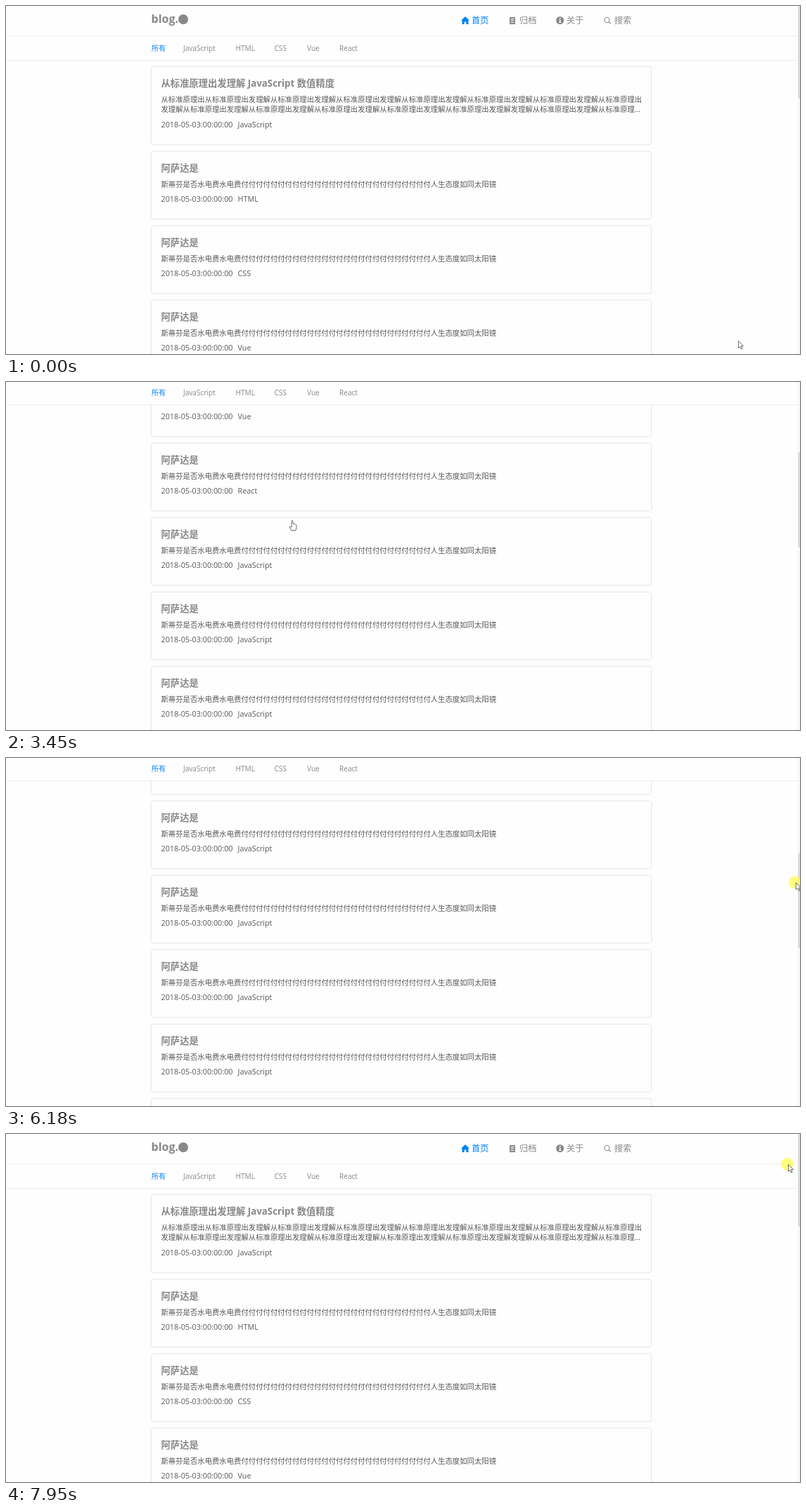
Recreate the animation shown at these times as an HTML page. Size 1129 by 496 pixels, loop 8 s.

```html
<!DOCTYPE html>
<html lang="zh">
<head>
<meta charset="utf-8">
<title>blog</title>
<style>
  html, body { margin: 0; width: 100%; height: 100%; overflow: hidden; background: #fefefe; }
  body { position: relative; font-family: "Open Sans", "Noto Sans CJK SC", "Noto Sans CJK", sans-serif; color: #888; }
  div, span, svg { position: absolute; }
  span { line-height: 20px; white-space: pre; }
  #page, #nav, #header { left: 0; width: 1129px; }
  #header { top: 0; height: 42px; border-bottom: 1px solid #f0f0f0; }
  #nav { height: 34px; background: #fefefe; border-bottom: 1px solid #ededed; }
  .card { left: 207px; width: 710px; background: #fefefe; border-radius: 2px; box-shadow: 0 0 3px rgba(0, 0, 0, .22); }
  .title { font-weight: 700; }
  .body { color: #585858; }
  .active { color: #007fff; }
  .icon { overflow: visible; fill: currentColor; top: 15px; }
  #logo { left: 245px; top: 12px; width: 14px; height: 14px; border-radius: 50%; background: #888; }
  #track { left: 1126px; top: 0; width: 3px; height: 496px; background: #f6f6f6; }
  #thumb { left: 0; width: 3px; background: #dcdcdc; border-radius: 2px; }
  #cursor { left: 0; top: 0; }
  #glow { left: -10px; top: -9px; width: 18px; height: 18px; border-radius: 50%; background: rgba(255, 252, 70, .7); }
  #cursor svg { left: 0; top: 0; overflow: visible; fill: #fff; stroke: #444; stroke-width: .8; stroke-linejoin: round; }
</style>
</head>
<body>
<div id="page">
  <div id="header"><div id="logo"></div></div>
</div>
<div id="nav"></div>
<div id="track"><div id="thumb"></div></div>
<div id="cursor">
  <div id="glow"></div>
  <svg id="arrow" width="8" height="13"><path d="M.4 .4V10.4L2.8 8.2 4.4 12 6 11.3 4.5 7.6H7.4Z"/></svg>
  <svg id="hand" width="11" height="16"><path d="M-1 9V1.2Q0-.6 1 1.2V5.2Q2.4 4.5 3 5.7 4.4 5.2 4.8 6.4 6 6.1 6 7.6V10.8L4.8 14.7H-1.2L-3.8 9.5Q-3.4 7.6-1 10Z"/></svg>
</div>
<script>
const LOOP = 8000;
const NAV_TOP = 43;      // scrolling past this pins the nav
const PIN_SHIFT = 52;    // content moves up when the nav leaves the flow
const THUMB_RATIO = 0.26;
const $ = id => document.getElementById(id);

// y is the vertical centre of the line
function addText(parent, x, y, size, text, cls = '') {
  const span = document.createElement('span');
  span.className = cls;
  span.textContent = text;
  span.style.cssText = `left:${x}px;top:${y - 10}px;font-size:${size}px`;
  parent.append(span);
}

function addCard(top, height, title, lines, tag) {
  const card = document.createElement('div');
  card.className = 'card';
  card.style.cssText = `top:${top}px;height:${height}px`;
  addText(card, 13.5, 23, 13.32, title, 'title');
  lines.forEach((line, i) => addText(card, 13.5, 46 + i * 14.4, 10.36, line, 'body'));
  addText(card, 13.5, height - 28, 10.8, '2018-05-03:00:00:00', 'body');
  addText(card, 122.5, height - 28, 10.8, tag, 'body');
  $('page').append(card);
}

const phrase = '从标准原理出发理解', stem = '从标准原理出', tail = '发理解';
addCard(87, 110, phrase + ' JavaScript 数值精度', [
  stem + phrase.repeat(6) + stem,
  tail + phrase.repeat(5) + tail + phrase + '从标准原理…'
], 'JavaScript');

const filler = '斯蒂芬是否水电费水电费' + '付'.repeat(26) + '人生态度如同太阳镜';
const tags = ['HTML', 'CSS', 'Vue', 'React'];
for (let i = 0; i < 16; i++) {
  addCard(208 + i * 106, 95, '阿萨达是', [filler], tags[i] || 'JavaScript');
}

[[207, '所有'], [252, 'JavaScript'], [326.5, 'HTML'], [381.5, 'CSS'], [428, 'Vue'], [474, 'React']]
  .forEach(([x, label], i) => addText($('nav'), x, 17, 10.1, label, i ? '' : 'active'));

addText($('header'), 206.5, 18, 16, 'blog.', 'title');
[
  [647, '首页', '<path d="M0 0 6-5.7 12 0H10.4V5.3H7.3V1.8H4.7V5.3H1.6V0Z" transform="translate(0 5.7)"/>'],
  [715, '归档', '<path fill-rule="evenodd" d="M1 1H9V11H1ZM2.7 3V4H7.3V3ZM2.7 5.2V6.2H7.3V5.2ZM2.7 8V9H7.3V8Z"/>'],
  [782, '关于', '<circle cx="5.7" cy="5.5" r="5.5"/><path fill="#fff" d="M5 2H6.7V3.5H5ZM4.6 4.5H6.6V8H7.3V9H4.3V8H5V5.5H4.6Z"/>'],
  [850, '搜索', '<g fill="none" stroke="currentColor" stroke-width="1.1"><circle cx="4.4" cy="4.9" r="3.6"/><path d="M7 7.5 9.8 10.3"/></g>']
].forEach(([x, label, shape], i) => {
  const cls = i ? '' : 'active';
  $('header').insertAdjacentHTML('beforeend',
    `<svg class="icon ${cls}" style="left:${x}px" width="12" height="12">${shape}</svg>`);
  addText($('header'), x + 15, 20.5, 12.2, label, cls);
});

const ramp = (t, from, to) => Math.min(1, Math.max(0, (t - from) / (to - from)));
const between = (t, from, to) => t >= from && t < to;

// Two wheel scrolls down, then the scrollbar is dragged up fast and released slowly
const scrollAt = t =>
  373 * ramp(t, 2311, 3121) + 718 * ramp(t, 3420, 5100)
  - 959 * ramp(t, 5500, 6640) - 132 * ramp(t, 6640, 7530);

// Pointer moves: from, to, then the place reached
const moves = [
  [60, 440, 426, 236], [940, 1360, 384, 186], [2360, 2740, 401, 189],
  [3200, 3300, 407, 197], [4400, 5320, 1131, 296],
  [5550, 6640, 1117, 91], [6640, 7750, 1112, 43]
];

function cursorAt(t) {
  let x = 1041, y = 477;
  for (const [from, to, endX, endY] of moves) {
    const k = ramp(t, from, to);
    x += (endX - x) * k;
    y += (endY - y) * k;
  }
  return [x, y];
}

function draw(now) {
  const t = Math.max(0, now) % LOOP;
  const scroll = scrollAt(t);
  const pinned = scroll > NAV_TOP;
  const offset = Math.round(scroll + (pinned ? PIN_SHIFT : 0));
  $('page').style.top = -offset + 'px';
  $('nav').style.top = (pinned ? -2 : NAV_TOP - offset) + 'px';
  $('thumb').style.top = Math.round(scroll * THUMB_RATIO) + 'px';
  $('thumb').style.height = (pinned ? 136 : 132) + 'px';

  const [x, y] = cursorAt(t);
  const overCard = x < 917;
  $('cursor').style.transform = `translate(${x}px,${y}px)`;
  $('hand').style.display = overCard ? '' : 'none';
  $('arrow').style.display = overCard ? 'none' : '';
  $('glow').style.display = between(t, 1590, 1900) || t >= 5550 ? '' : 'none';
  requestAnimationFrame(draw);
}
requestAnimationFrame(draw);
</script>
</body>
</html>
```
